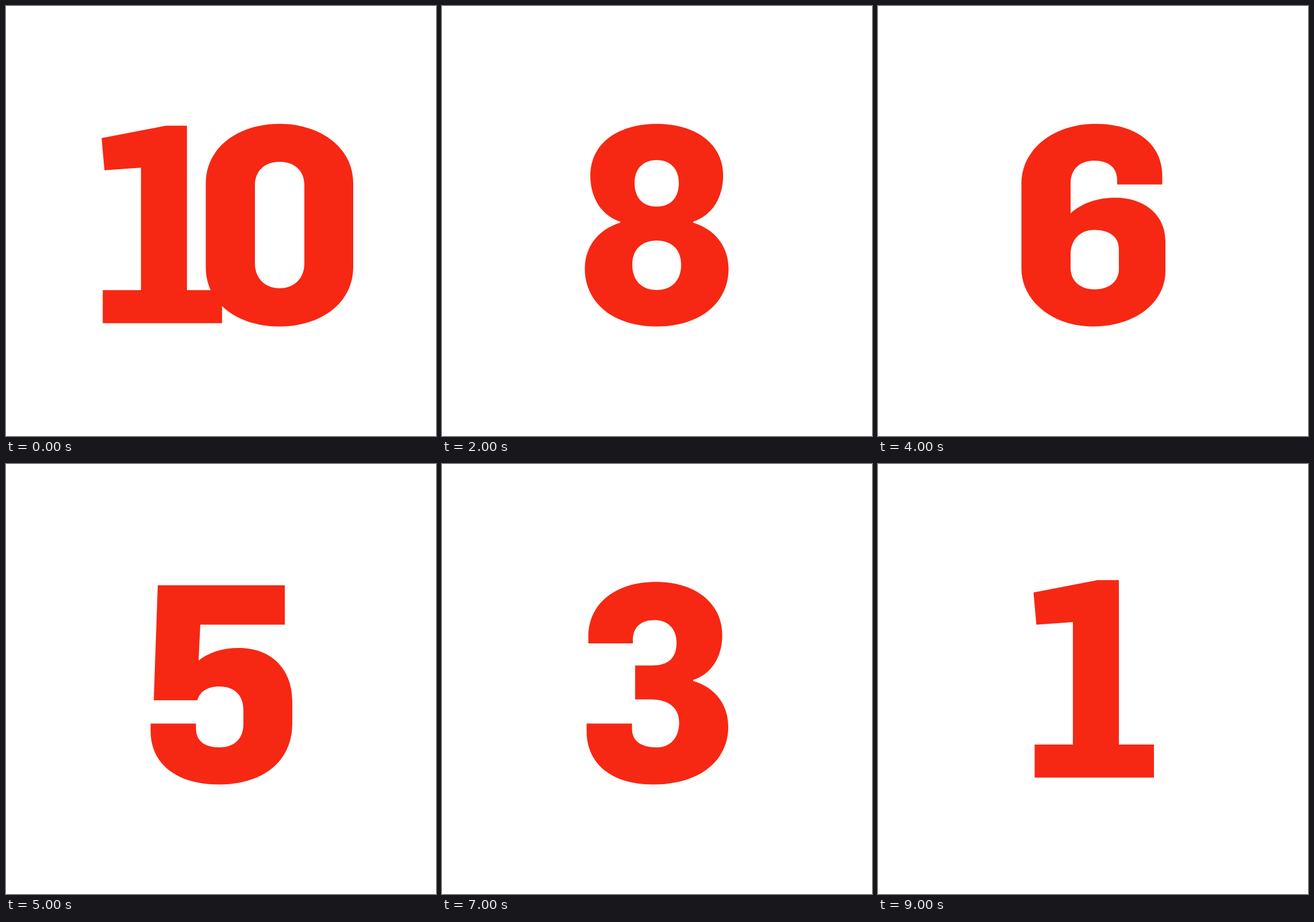
Write an HTML page that moves like this. It is 748 px wide and 748 px high and loops after 10000 ms.

```html
<!DOCTYPE html>
<html lang="en">
<head>
<meta charset="utf-8">
<title>Countdown</title>
<style>
  html, body { margin: 0; width: 100%; height: 100%; overflow: hidden; background: #fff; }
  svg { display: block; width: 100%; height: 100%; fill: #f62813; }
</style>
</head>
<body>
<svg viewBox="0 0 748 748" role="img" aria-label="Countdown from ten to one">
  <g id="n10">
    <use href="#one" x="-104.2" y="6.3"/>
    <path fill-rule="evenodd" d="M476 205C546 205 604 245 604 309V454C604 518 546 557.5 476 557.5C404 557.5 347.5 518 347.5 454V309C347.5 245 405 205 476 205Z
      M476 271C451 271 433 286 433 312V448C433 474 451 491 476 491C501 491 519 474 519 448V312C519 286 501 271 476 271Z"/>
  </g>
  <path id="n9" fill-rule="evenodd" d="M374 205C444 205 498.5 248 498.5 306V458C498.5 512 444 557.5 371 557.5C300 557.5 253.5 524 253.5 466V451.5H332V460C332 481 347 493 371 493C397 493 413 478 413 453V400C399 419 373 430 337 430C284 430 248.5 398 248.5 352V300C248.5 244 299 205 374 205Z
    M371.5 267.5C347 267.5 329.5 282 329.5 304V339C329.5 360 346 373.5 369 373.5C396 373.5 413 355 413 329V308C413 282 396 267.5 371.5 267.5Z"/>
  <path id="n8" fill-rule="evenodd" d="M373.5 205C442 205 489 240 489 295C489 334 469 365 437 375V377C474 388 498.5 418 498.5 457C498.5 517 448 557.5 373.5 557.5C299 557.5 248.5 517 248.5 457C248.5 418 273 388 310 377V375C278 365 258 334 258 295C258 240 305 205 373.5 205Z
    M373.5 268C350 268 335 283 335 308C335 334 350 349 373.5 349C397 349 412 334 412 308C412 283 397 268 373.5 268Z
    M373.5 408C347 408 331 424 331 450C331 477 347 494 373.5 494C400 494 416 477 416 450C416 424 400 408 373.5 408Z"/>
  <path id="n7" d="M250.5 211H492.5V269C416 346 372.5 454 372.5 551.5H286C288 457 342 343 402 279.5H250.5Z"/>
  <path id="n6" fill-rule="evenodd" d="M378 205C450 205 494.5 240 494.5 296V310.5H416V303C416 281 401 269 376 269C351 269 335 284 335 309V360.5C355 343 381 333.5 413 333.5C464 333.5 500 364 500 409V461C500 517 446 557.5 374 557.5C304 557.5 249.5 513 249.5 457V308C249.5 250 305 205 378 205Z
    M376 389.5C351 389.5 335 407 335 433V455C335 479 352 493 377 493C402 493 419 479 419 458V423C419 401 402 389.5 376 389.5Z"/>
  <path id="n5" d="M264 211H485V279.5H338L335 342C352 328 376 320 405 320C462 320 498 357 498 413V452C498 517 447 557.5 371 557.5C298 557.5 251.5 523 251.5 464V451.5H330.5V460C330.5 482 346 493 371 493C397 493 413 478 413 452V428C413 402 397 387 371 387C350 387 337 396 333 411H257Z"/>
  <path id="n4" d="M372 211H463.5L332 413.5H392.5V371.5L471 321V413.5H507.5V477H471V551.5H392.5V477H247V416.5Z"/>
  <path id="n3" d="M372 205C441 205 487.5 242 487.5 298C487.5 336 468 366 437 375.5V377.5C474 388 498 418 498 457C498 517 447 557.5 368 557.5C296 557.5 251.5 523 251.5 464V451.5H330.5V460C330.5 482 346 493 374 493C397 493 412.5 476 412.5 450C412.5 424 394 409.5 364 409.5H336V350.5H365C394 350.5 408 338 408 310C408 287 393 271.5 370 271.5C346 271.5 332 284 332 306V312H254.5V300C254.5 242 303 205 372 205Z"/>
  <path id="n2" d="M375 205C443 205 489 240 489 299C489 347 462 378 425 415L360 481H492V549.5H261V481L362 373C393 341 404 325 404 304C404 283 392 270 373 270C350 270 338 284 338 308V320H261V305C261 245 306 205 375 205Z"/>
  <g id="n1">
    <use href="#one"/>
  </g>
  <defs>
    <path id="one" d="M270.5 223.5L382 202H419V488H480V545.5H272.5V488H339V275L275.5 279.5Z"/>
  </defs>
</svg>
<script>
  const START = 10;
  const numerals = Array.from({ length: START }, (_, i) => document.getElementById(`n${START - i}`));

  function draw() {
    const second = Math.floor(performance.now() / 1000) % START;
    numerals.forEach((numeral, i) => {
      numeral.style.display = i === second ? "" : "none";
    });
    requestAnimationFrame(draw);
  }
  draw();
</script>
</body>
</html>
```
